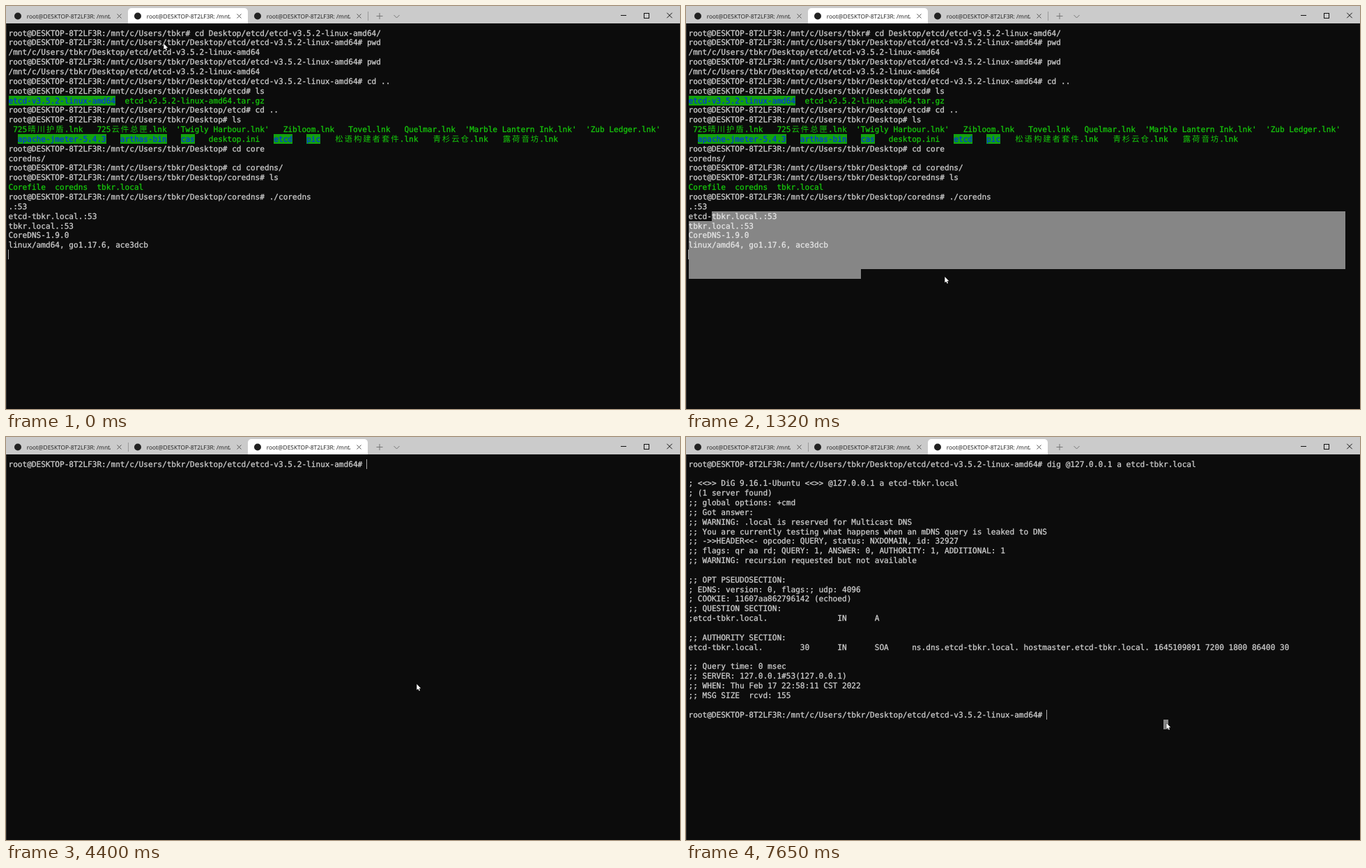
These frames come from a looping animation (967x579 px, 8000 ms). An HTML page with a canvas:

```html
<!DOCTYPE html>
<html lang="en">
<head>
<meta charset="utf-8">
<title>Terminal session</title>
<style>
html, body { margin: 0; width: 100%; height: 100%; overflow: hidden; background: #0c0c0c; }
canvas { display: block; }
</style>
</head>
<body>
<canvas id="stage" width="967" height="579"></canvas>
<script>
const ctx = document.getElementById('stage').getContext('2d');
const LOOP = 8000, BLINK = 530, TRAVEL = 390, TICK = 130;
const LEFT = 3.5, TOP = 32, CELL = 6.681, LINE = 13.846, COLS = 141, TAB = 172, BAR = 25;
const MONO = '11.1px "DejaVu Sans Mono", monospace';
const CJK = '11.4px "Noto Sans CJK SC", "Noto Sans CJK", sans-serif';
const USER = 'tbkr', HOST = 'root@DESKTOP-8T2LF3R:', HOME = HOST + '/mnt/c/Users/' + USER;
const DESK = HOME + '/Desktop', ETCD = DESK + '/etcd', PKG = ETCD + '/etcd-v3.5.2-linux-amd64';
const PKG_PATH = PKG.slice(HOST.length), ZONE = `etcd-${USER}.local`;

// A leading ~ makes a line green, braces mark highlighted directories.
const server = `${HOME}# cd Desktop/etcd/etcd-v3.5.2-linux-amd64/
${PKG}# pwd
${PKG_PATH}
${PKG}# pwd
${PKG_PATH}
${PKG}# cd ..
${ETCD}# ls
~{etcd-v3.5.2-linux-amd64}  etcd-v3.5.2-linux-amd64.tar.gz
${ETCD}# cd ..
${DESK}# ls
~ 725晴川护盾.lnk   725云件总匣.lnk  'Twigly Harbour.lnk'   Zibloom.lnk   Tovel.lnk   Quelmar.lnk  'Marble Lantern Ink.lnk'  'Zub Ledger.lnk'
~  {apache-jmeter-5.4.3}   {arthas-bin}   {cas}   desktop.ini   {etcd}   {pic}   松语构建者套件.lnk   青杉云仓.lnk   露荷音坊.lnk
${DESK}# cd core
coredns/
${DESK}# cd coredns/
${DESK}/coredns# ls
~Corefile  coredns  ${USER}.local
${DESK}/coredns# ./coredns
.:53
${ZONE}.:53
${USER}.local.:53
CoreDNS-1.9.0
linux/amd64, go1.17.6, ace3dcb
`.split('\n');

const prompt = PKG + '# ', query = `${prompt}dig @127.0.0.1 a ${ZONE}`;
const answer = `${query}

; <<>> DiG 9.16.1-Ubuntu <<>> @127.0.0.1 a ${ZONE}
; (1 server found)
;; global options: +cmd
;; Got answer:
;; WARNING: .local is reserved for Multicast DNS
;; You are currently testing what happens when an mDNS query is leaked to DNS
;; ->>HEADER<<- opcode: QUERY, status: NXDOMAIN, id: 32927
;; flags: qr aa rd; QUERY: 1, ANSWER: 0, AUTHORITY: 1, ADDITIONAL: 1
;; WARNING: recursion requested but not available

;; OPT PSEUDOSECTION:
; EDNS: version: 0, flags:; udp: 4096
; COOKIE: 11607aa862796142 (echoed)
;; QUESTION SECTION:
;${ZONE}.               IN      A

;; AUTHORITY SECTION:
${ZONE}.        30      IN      SOA     ns.dns.${ZONE}. hostmaster.${ZONE}. 1645109891 7200 1800 86400 30

;; Query time: 0 msec
;; SERVER: 127.0.0.1#53(127.0.0.1)
;; WHEN: Thu Feb 17 22:58:11 CST 2022
;; MSG SIZE  rcvd: 155

${prompt}`.split('\n');

// Each key press or tab switch restarts the cursor blink.
const screens = [
  { at: 0, text: server }, { at: 2370, text: [prompt] }, { at: 4400, text: [prompt] },
  { at: 4520, text: [prompt + 'clear'] }, { at: 4770, text: [query] }, { at: 5480, text: answer }
];
const drag = { from: 420, to: 1170, clear: 1470, row: 25, col: 37 };
const click = 7650, hide = 5480, show = 6320;

// Pointer waypoints: arrival time, x, y.
const way = [
  [0, 226, 54], [270, 154, 328], [420, 250, 382], [810, 81, 327], [1170, 38, 300],
  [1320, 371, 389], [1470, 371, 374], [1740, 342, 6], [2130, 440, 14], [2370, 443, 45],
  [2490, 528, 336], [2640, 557, 393], [3040, 589, 355], [show, 552, 350], [6590, 81, 359],
  [6870, 74, 321], [7260, 386, 364], [click, 689, 411]
];

const colAt = x => (x - LEFT) / CELL, rowAt = y => Math.floor((y - TOP) / LINE);
const colX = col => Math.round(LEFT + col * CELL);
const rowY = row => Math.round(TOP + row * LINE);

function pointerAt(t) {
  const next = way.findIndex(w => w[0] > t);
  if (next < 0) return way[way.length - 1].slice(1);
  const [t0, x0, y0] = way[next - 1], [t1, x1, y1] = way[next];
  const start = Math.max(t0, t1 - TRAVEL), count = Math.round((t1 - start) / TICK);
  const p = Math.max(0, Math.floor((t - start) / (t1 - start) * count) / count);
  return [x0 + (x1 - x0) * p, y0 + (y1 - y0) * p].map(Math.round);
}

function box(x, y, w, h, color) {
  ctx.fillStyle = color;
  ctx.fillRect(x, y, w, h);
}

function lines(color, ...paths) {
  ctx.strokeStyle = color;
  ctx.lineWidth = 1;
  ctx.beginPath();
  for (const path of paths)
    path.forEach(([x, y], i) => i ? ctx.lineTo(x, y) : ctx.moveTo(x, y));
  ctx.stroke();
}

function cross(x, y, r, color) {
  lines(color, [[x - r, y - r], [x + r, y + r]], [[x - r, y + r], [x + r, y - r]]);
}

function drawTabs(active, hover) {
  box(0, 0, 967, BAR, '#cbcbcb');
  for (let i = 0; i < 3; i++) {
    const x = i * TAB;
    if (i === active || i === hover) {
      ctx.fillStyle = i === active ? '#fff' : '#e0e0e0';
      ctx.beginPath();
      ctx.roundRect(x + 3, 3, TAB, BAR - 3, [5, 5, 0, 0]);
      ctx.fill();
    }
    ctx.fillStyle = '#222';
    ctx.beginPath();
    ctx.arc(x + 17, 14.5, 5, 0, 7);
    ctx.fill();
    ctx.save();
    ctx.beginPath();
    ctx.rect(x + 29, 3, 121, 22);
    ctx.clip();
    ctx.font = '8.4px "Open Sans", "Noto Sans", sans-serif';
    ctx.fillStyle = '#1a1a1a';
    ctx.fillText(HOST + ' /mnt/c/Users', x + 29.7, 18);
    ctx.restore();
    cross(x + 162.5, 14.5, 3, '#555');
    if (i !== active && i + 1 !== active) box(x + 175, 8, 1, 13, '#999');
  }
  lines('#777', [[531.5, 14.5], [540.5, 14.5]], [[536, 10], [536, 19]]);
  lines('#777', [[556.5, 13], [560.5, 17], [564.5, 13]]);
  lines('#111', [[882, 13.5], [890, 13.5]]);
  ctx.strokeRect(915.5, 10.5, 7, 7);
  cross(952, 13.5, 3.7, '#111');
}

function drawLine(text, row) {
  const green = text[0] === '~', y = Math.round(TOP + row * LINE + 10.6);
  let col = 0, dir = false;
  ctx.lineWidth = .3;
  for (const ch of green ? text.slice(1) : text) {
    if (ch === '{' || ch === '}') { dir = ch === '{'; continue; }
    const wide = ch > '\u2fff', x = LEFT + col * CELL + (wide ? 1 : 0);
    if (dir) box(colX(col), rowY(row), colX(col + 1) - colX(col), rowY(row + 1) - rowY(row), '#13a10e');
    ctx.font = wide ? CJK : MONO;
    ctx.fillStyle = ctx.strokeStyle = dir ? '#0037da' : green ? '#16c60c' : '#ccc';
    ctx.fillText(ch, x, y);
    if (!wide) ctx.strokeText(ch, x, y);
    col += wide ? 2 : 1;
  }
  return col;
}

function drawSelection(row, col, endRow, endCol) {
  for (let r = row; r <= endRow; r++) {
    const from = colX(r === row ? col : 0), to = colX(r === endRow ? endCol : COLS);
    box(from, rowY(r), to - from, rowY(r + 1) - rowY(r), 'rgba(255,255,255,.5)');
  }
}

function drawPointer(x, y) {
  const shape = new Path2D('M0 0V8.6L2 6.8 3.3 9.8 4.7 9.2 3.4 6.3H6Z');
  ctx.save();
  ctx.translate(x + .3, y);
  ctx.lineWidth = 1;
  ctx.strokeStyle = '#000';
  ctx.stroke(shape);
  ctx.fillStyle = '#fff';
  ctx.fill(shape);
  ctx.restore();
}

function draw(t, screen, [x, y], cursor) {
  const { text } = screen;
  box(0, 0, 967, 579, '#0c0c0c');
  box(0, BAR, 1, 579 - BAR, '#333');
  drawTabs(text === server ? 1 : 2, y < BAR ? Math.floor((x - 3) / TAB) : -1);
  let end = 0;
  text.forEach((line, row) => end = drawLine(line, row));
  if (cursor) box(Math.floor(LEFT + end * CELL), rowY(text.length - 1), 1, 14, '#aaa');
  if (t >= drag.from && t < drag.clear) {
    const [fx, fy] = pointerAt(Math.min(t, drag.to));
    drawSelection(rowAt(fy), Math.round(colAt(fx)), drag.row, drag.col);
  }
  if (t >= click) {
    const row = rowAt(y), col = Math.floor(colAt(x));
    drawSelection(row, col, row, col + 1);
  }
  if (t < hide || t >= show) drawPointer(x, y);
}

let shown;
function tick(now) {
  const t = now % LOOP, screen = screens.filter(s => s.at <= t).pop();
  const pointer = pointerAt(t), cursor = (t - screen.at) % (2 * BLINK) < BLINK;
  const state = [screen.at, pointer, cursor].join();
  if (state !== shown) draw(t, screen, pointer, cursor);
  shown = state;
  requestAnimationFrame(tick);
}
ctx.textRendering = 'geometricPrecision';
requestAnimationFrame(tick);
</script>
</body>
</html>
```
